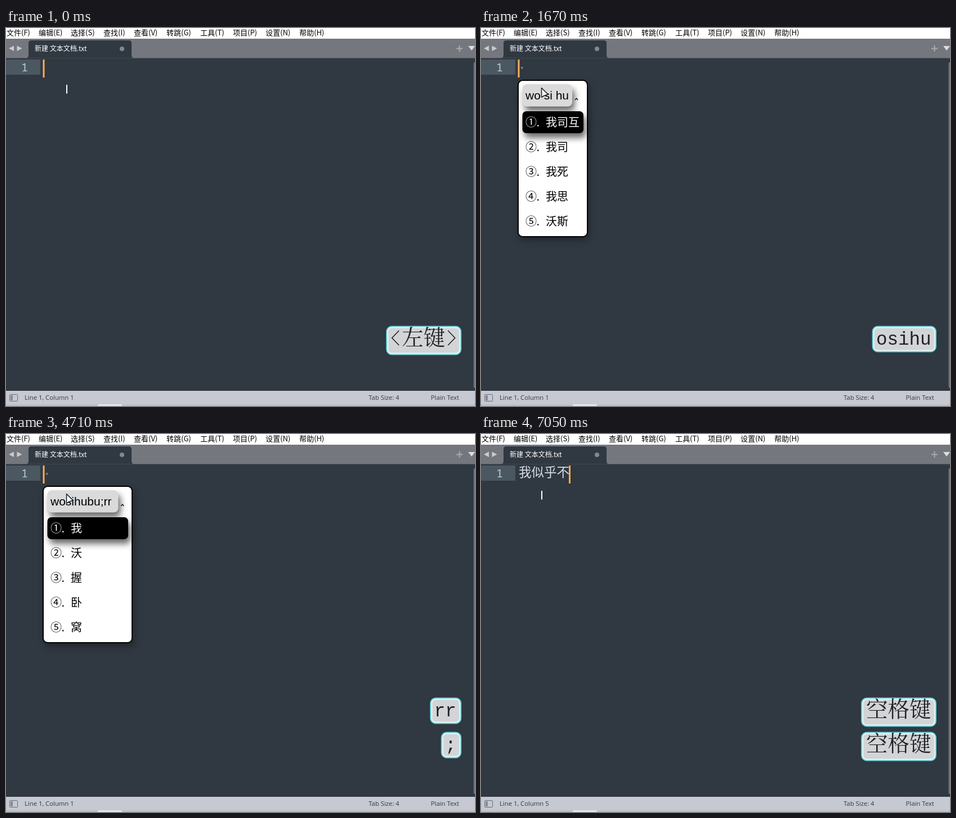
These frames come from a looping animation (833x672 px, 7.25 s). An HTML page:

```html
<!DOCTYPE html>
<html lang="zh">
<head>
<meta charset="utf-8">
<style>
  html, body { margin: 0; width: 100%; height: 100%; overflow: hidden; background: #303841; }
  svg { display: block; width: 833px; height: 672px; }
  text { white-space: pre; }
  .cjk { font-family: "Noto Sans CJK SC", "Noto Sans CJK", "Noto Sans CJK JP", sans-serif; }
  .latin { font: 21px "Liberation Sans", sans-serif; }
  .menu { font-size: 13px; }
  .status { font: 11.3px "Open Sans", "Noto Sans", sans-serif; fill: #343a42; }
  .item { font-size: 20px; }
  .key { font: 32.5px "Liberation Mono", monospace; fill: #1f2126; }
  .keyCjk { font: 200 38.5px "Noto Serif CJK SC", "Noto Sans CJK SC", "Noto Sans CJK", serif; fill: #1f2126; }
  .panel { filter: drop-shadow(3px 6px 6px rgba(0,0,0,.3)); }
  .raised { filter: drop-shadow(4px 8px 6px rgba(0,0,0,.6)); }
</style>
</head>
<body>
<svg viewBox="0 0 833 672">
  <rect width="833" height="672" fill="#303841"/>
  <rect width="833" height="19" fill="#fff"/>
  <g id="menu" class="cjk menu"></g>

  <rect y="19" width="833" height="34.5" fill="#74787e"/>
  <path d="M35 53.5Q40 53.5 40 48V27Q40 22 45 22H218Q223 22 223 27V48Q223 53.5 228 53.5Z" fill="#303841"/>
  <path d="M14 31.5V41L5 36.2ZM19.500 31.500V41L28.500 36.2Z" fill="#c9cbce"/>
  <text x="51" y="41" class="cjk" font-size="12" fill="#fff">新建 文本文档.txt</text>
  <circle cx="206" cy="37" r="4" fill="#84878c"/>
  <path d="M800 36.500H811M805.500 31V42" stroke="#a9abae" stroke-width="2"/>
  <path d="M821 32H833L827 40Z" fill="#dcdddf"/>

  <rect y="56" width="61" height="27" fill="#4b5861"/>
  <text x="33" y="77" text-anchor="middle" font-size="20" font-family="Noto Sans Mono, monospace" fill="#b9cfdb">1</text>
  <rect x="830.5" y="61" width="4" height="579" rx="2" fill="#6d737a"/>

  <rect y="645" width="833" height="27" fill="#c6c9d1"/>
  <rect y="669" width="833" height="3" fill="#bcc0c7"/>
  <rect x="163" y="669" width="43" height="5" rx="2" fill="#e2eaec"/>
  <rect x="6.500" y="651.500" width="14" height="12" rx="1" fill="none" stroke="#666b73"/>
  <rect x="8" y="653" width="4" height="9" fill="#858a92"/>
  <text id="position" class="status" x="33" y="661"></text>
  <text class="status" x="644" y="661">Tab Size: 4</text>
  <text class="status" x="754.5" y="661">Plain Text</text>

  <text id="committed" class="cjk" x="67" y="76" font-size="22.5" font-weight="300" fill="#d8dee9">我似乎不</text>
  <rect id="composeDot" x="71" y="69" width="3.500" height="3.500" fill="#747a81"/>
  <rect id="caret" y="56" width="3" height="32" fill="#f9ae58"/>
  <g id="popup"></g>
  <rect id="beam" x="107" y="101" width="2" height="15.500" fill="#fff"/>
  <path id="arrow" d="M107.500 106.500V123L112 120.500L119 118Z" fill="#f4f8fa" stroke="#17212b" stroke-width="1.5" stroke-linejoin="round"/>
  <g id="badges"></g>
</svg>
<script>
const LOOP = 7250, COMMIT = 6440, FADE = 400;
const el = id => document.getElementById(id);
const pen = document.createElement('canvas').getContext('2d');
pen.font = '21px "Liberation Sans", sans-serif';

const menus = [[1, '文件(F)'], [58, '编辑(E)'], [115, '选择(S)'], [173, '查找(I)'], [227, '查看(V)'],
  [285, '转跳(G)'], [345, '工具(T)'], [403, '项目(P)'], [461, '设置(N)'], [521, '帮助(H)']];
el('menu').innerHTML = menus.map(([x, s]) => `<text x="${x}" y="13">${s}</text>`).join('');

// start time, converted prefix, raw input, candidates ("|" splits off a hint)
const firstList = '我司 我死 我思 沃斯 我';
const fullList = '我司互补 我司 我死 我思 沃斯';
const compositions = [
  [200, '', 'w', '我 为 无 玩 万'],
  [540, '', 'wo', '我 沃 握 卧 窝'],
  [740, '', 'wo s', '我是 我说 我 沃 握'],
  [870, '', 'wo si', firstList],
  [1270, '', 'wo si h', firstList],
  [1610, '', 'wo si hu', '我司互 我司 我死 我思 沃斯'],
  [1870, '', 'wo si hu b', fullList],
  [2070, '', 'wo si hu bu', fullList],
  [2270, '', 'wosihubu;', fullList],
  [4050, '', 'wosihubu;rr ', fullList],
  [4710, '', 'wosihubu;rr ', '我 沃 握 卧 窝'],
  [5240, '我', 'sihubu;rr ', '似乎 似虎 似|(rr)'],
  [5970, '我似乎', 'bu', '不 部 步 布 补'],
];

// labels over time, moments that push the badge up, moment it is gone
const badges = [
  { labels: [[0, '<左键>']], pushes: [200], end: 1150 },
  { labels: [[200, 'w'], [540, 'wo'], [740, 'wos'], [870, 'wosi'], [1270, 'wosih'], [1610, 'osihu'],
      [1870, 'sihub'], [2070, 'ihubu'], [2270, 'hubu;']], pushes: [3460], end: 3850 },
  { labels: [[3460, 'r'], [4050, 'rr']], pushes: [4710, 5240], end: 5840 },
  { labels: [[4710, ';']], pushes: [5240, 5970], end: 6440 },
  { labels: [[5240, '空格键']], pushes: [5970, 6440], end: 7050 },
  { labels: [[5970, '空格键']], pushes: [6440], end: Infinity },
  { labels: [[6440, '空格键']], pushes: [], end: Infinity },
];

const latest = (list, t) => list.filter(([start]) => start <= t).pop();

function candidate(entry, i, dy) {
  const [word, hint] = entry.split('|');
  const y = 175 + 44 * i + dy;
  const fill = i ? '#000' : '#fff';
  return `<g fill="${fill}" class="cjk item"><text x="79" y="${y}">${'①②③④⑤'[i]}</text>
    <text x="98.5" y="${y}">.</text><text x="115" y="${y}">${word}</text>
    ${hint ? `<text class="latin" x="159" y="${y}">${hint}</text>` : ''}</g>`;
}

function drawPopup([, prefix, input, list]) {
  const words = list.split(' ');
  const dy = prefix ? 1 : 0;
  const textX = prefix ? 89 + 20 * prefix.length : 79;
  const chipRight = textX + pen.measureText(input).width + 6;
  const mark = chipRight + 7.5;
  const longest = Math.max(...words.map(w => w.split('|')[0].length));
  const right = Math.round(Math.max(mark + 18.5, 129.5 + 20 * longest));
  const bottom = 151 + 44 * words.length + dy;
  return `<rect class="panel" x="66" y="93" width="${right - 67}" height="${bottom - 93}" rx="8" fill="#fff" stroke="#000" stroke-width="2"/>
    <rect class="raised" x="${textX - 5.5}" y="100" width="${chipRight - textX + 5.5}" height="${39.5 + dy}" rx="8" fill="#dadada"/>
    <text class="cjk item" x="79" y="127">${prefix}</text>
    <text class="latin" x="${textX}" y="127">${input}</text>
    <path d="M${mark - 2.5} ${128 + dy}l2.500 -3l2.500 3" fill="none" stroke="#000" stroke-width="1.2"/>
    <rect class="raised" x="73.5" y="${148 + dy}" width="${right - 81.5}" height="39" rx="7"/>
    ${words.map((w, i) => candidate(w, i, dy)).join('')}`;
}

function badgeText(label) {
  if (label === '<左键>') {
    return `<text class="keyCjk" x="703" y="34">左键</text>
      <path d="M698 8L685.500 21L698 34M785 8L797.500 21L785 34" fill="none" stroke="#1f2126" stroke-width="1.6"/>`;
  }
  return /[a-z;]/.test(label)
    ? `<text class="key" x="799.5" y="32.5" text-anchor="end">${label}</text>`
    : `<text class="keyCjk" x="684" y="34">${label}</text>`;
}

function drawBadge({ labels, pushes, end }, t) {
  const current = latest(labels, t);
  if (!current || t >= end) return '';
  const label = current[1];
  const latin = /^[a-z;]+$/.test(label);
  const left = latin ? 793 - 19.5 * label.length : 676;
  const height = latin ? 45 : 50;
  const y = 530 - 61 * pushes.filter(p => p <= t).length;
  const opacity = Math.min(1, (end - t) / FADE) ** 1.3;
  const w = 808 - left;
  return `<g transform="translate(0 ${y})" opacity="${opacity}">
    <rect x="${left}" y=".5" width="${w}" height="${height}" rx="9" fill="#d3d4d6" stroke="#5cc8cf" stroke-width="2"/>
    <rect x="${left + 2}" y="2.5" width="${w - 4}" height="${height - 4}" rx="7" fill="none" stroke="#dcf4f6" stroke-width="2.5"/>
    ${badgeText(label)}</g>`;
}

const show = (id, on) => el(id).setAttribute('visibility', on ? 'visible' : 'hidden');
let shown;

function render(t) {
  const done = t >= COMMIT;
  const composition = done ? undefined : latest(compositions, t);
  if (shown !== composition) {
    el('popup').innerHTML = composition ? drawPopup(composition) : '';
    shown = composition;
  }
  show('composeDot', composition);
  show('arrow', composition);
  show('beam', !composition);
  show('committed', done);
  el('caret').setAttribute('x', done ? 156 : 65.5);
  el('position').textContent = `Line 1, Column ${done ? 5 : 1}`;
  el('badges').innerHTML = badges.map(b => drawBadge(b, t)).join('');
}

const begin = performance.now();
function tick() {
  render((performance.now() - begin) % LOOP);
  requestAnimationFrame(tick);
}
tick();
</script>
</body>
</html>
```
